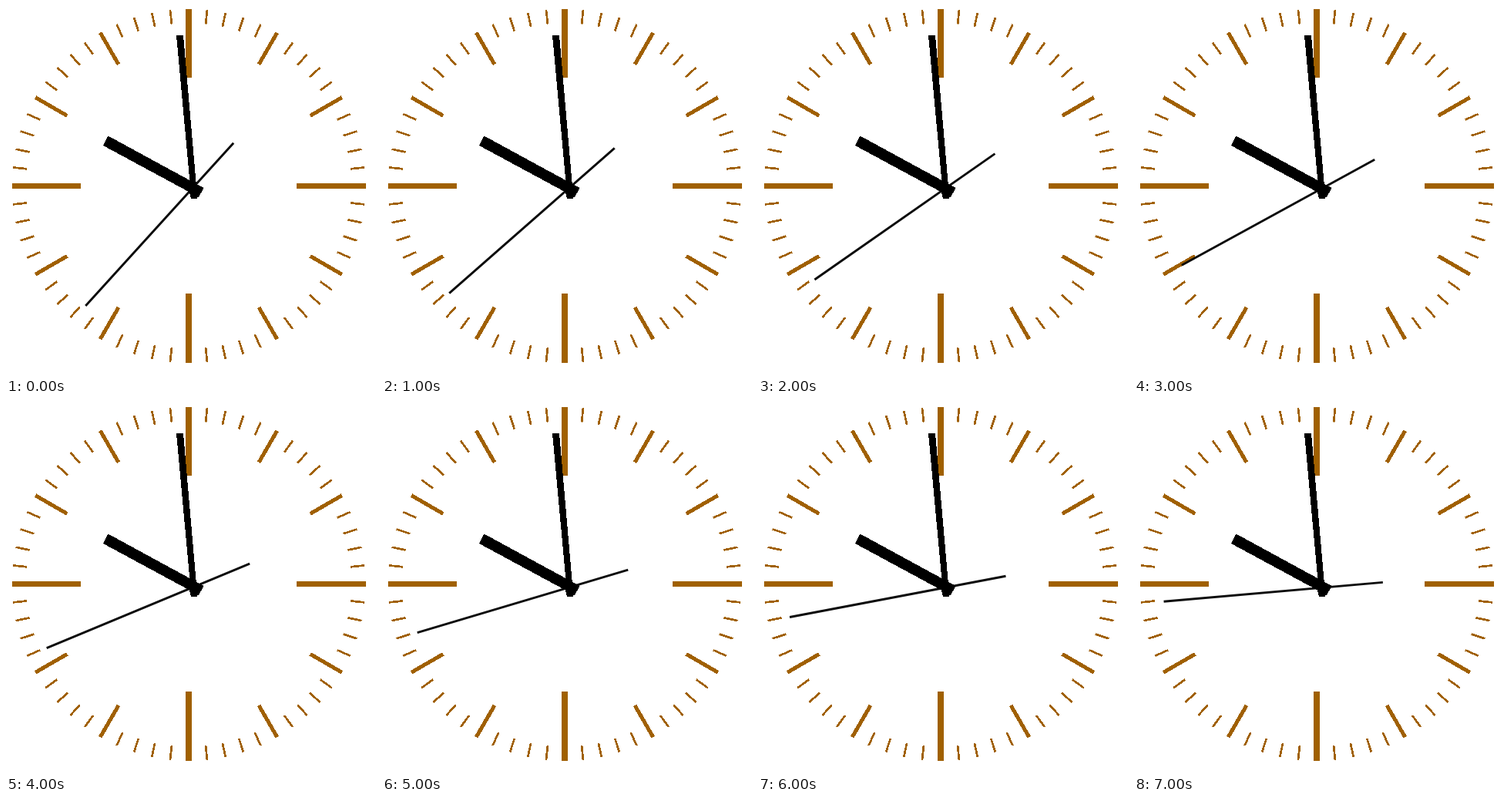
An HTML page that plays this animation: 480x480 px, repeating every 8000 ms.

```html
<!DOCTYPE html>
<html lang="en">
<head>
<meta charset="utf-8">
<title>Clock</title>
<style>
  html, body { margin: 0; width: 100%; height: 100%; overflow: hidden; background: #fff; }
  svg { display: block; width: 480px; height: 480px; }
</style>
</head>
<body>
<svg viewBox="0 0 480 480">
  <g id="dial" stroke="#a06000" shape-rendering="crispEdges"></g>
  <line id="second" stroke="#0c0c0c" stroke-width="2.9"/>
  <g shape-rendering="crispEdges">
    <polygon points="132.5,168.5 256.5,236 250,248 126,181"/>
    <polygon points="221,38 230,38 247,234 251,241 248,250 240,250 238,242 239,234"/>
  </g>
</svg>
<script>
const DIAL_CENTER = { x: 237, y: 233.4 };
const PIVOT = { x: 236.5, y: 242 };
const DIAL_RADIUS = 229.5;
const TIP_LENGTH = 198.4;
const TAIL_LENGTH = 87;
const STEP_MS = 1000;
const STEPS = 8;

const dial = document.getElementById('dial');
const second = document.getElementById('second');

// Point at a clockwise angle in degrees, measured from twelve o'clock
function polar(center, degrees, radius) {
  const angle = degrees * Math.PI / 180;
  return { x: center.x + radius * Math.sin(angle), y: center.y - radius * Math.cos(angle) };
}

function setLine(line, from, to) {
  const ends = { x1: from.x, y1: from.y, x2: to.x, y2: to.y };
  Object.entries(ends).forEach(([key, value]) => line.setAttribute(key, value));
}

function addTick(minute) {
  const [inner, width] = minute % 15 === 0 ? [140, 7.4]
    : minute % 5 === 0 ? [182, 5]
    : [211, 2.7];
  const line = document.createElementNS('http://www.w3.org/2000/svg', 'line');
  setLine(line, polar(DIAL_CENTER, minute * 6, inner), polar(DIAL_CENTER, minute * 6, DIAL_RADIUS));
  line.setAttribute('stroke-width', width);
  dial.appendChild(line);
}

// The hand slows slightly, and its tail lags a little behind the tip
function poseSecondHand(step) {
  const slowing = 0.06 * step * step;
  const tipAngle = 222.2 + 6.66 * step - slowing;
  const tailAngle = 42.4 + 6.22 * step - slowing;
  setLine(second, polar(PIVOT, tipAngle, TIP_LENGTH), polar(PIVOT, tailAngle, TAIL_LENGTH));
}

function draw() {
  poseSecondHand(Math.floor(performance.now() / STEP_MS) % STEPS);
  requestAnimationFrame(draw);
}

for (let minute = 0; minute < 60; minute++) addTick(minute);
draw();
</script>
</body>
</html>
```
